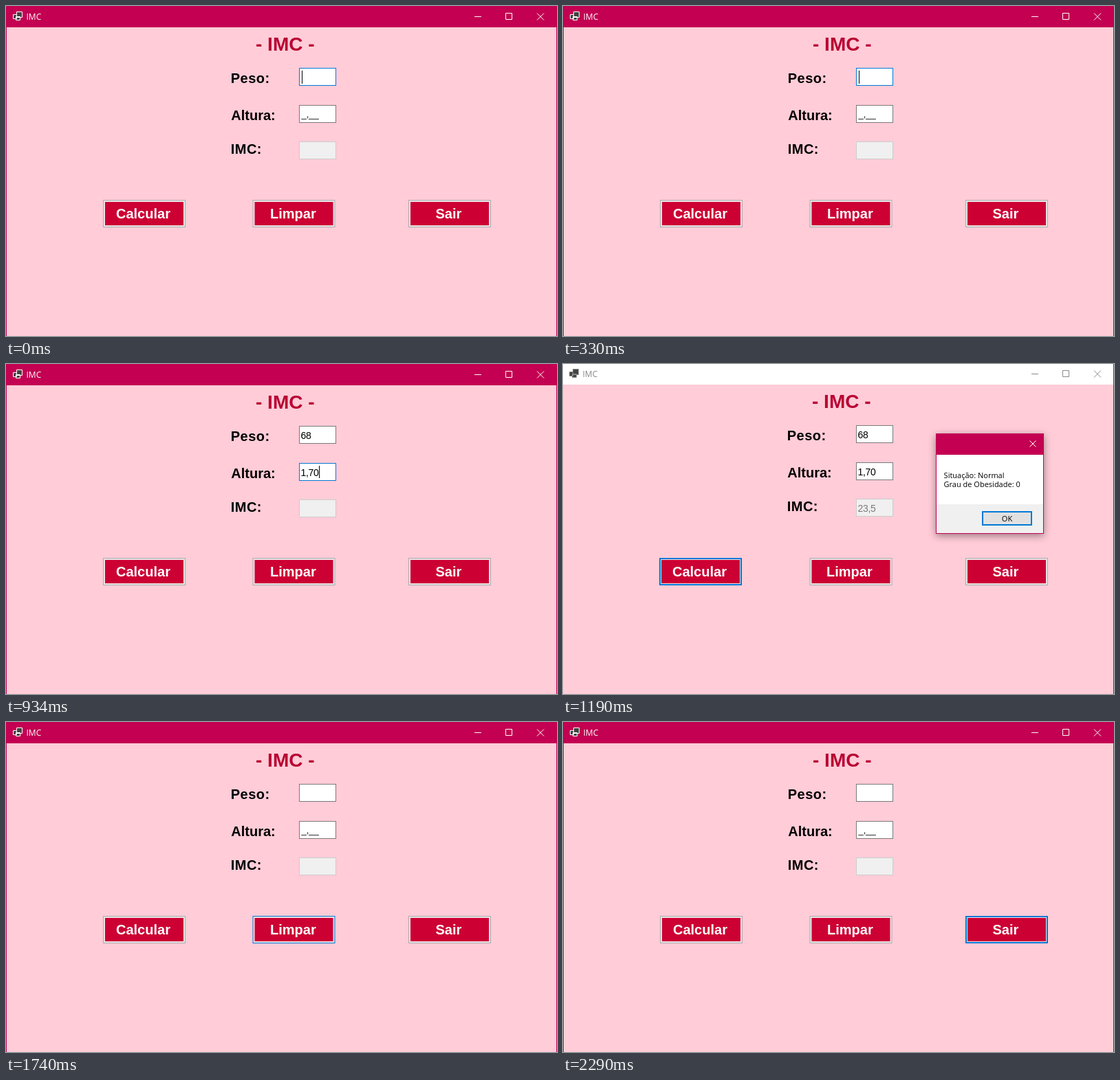
Animation, 801 px wide and 480 px high, one loop 2840 ms. Source, as an HTML page:

```html
<!DOCTYPE html>
<html lang="pt">
<head>
<meta charset="utf-8">
<title>IMC</title>
<style>
html, body { margin: 0; width: 100%; height: 100%; overflow: hidden; background: #ffccd8; }
svg {
  display: block; width: 801px; height: 480px;
  --dx: 0px; --dy: 0px;
  --bar: #c30052; --ink: #fff; --left: #c30052; --right: #c30052;
  --typed: 0; --blank: 1; --result: 0; --caret1: 1; --caret2: 0;
  --peso: #0078d7; --altura: #7a7a7a;
  --calc: #adadad; --limpar: #adadad; --sair: #adadad;
  --calcRing: #e1e1e1; --sairRing: #e1e1e1;
  animation: demo 2840ms step-end infinite;
}
@keyframes demo {
  0% {
    --dx: 0px; --dy: 0px;
    --bar: #c30052; --ink: #fff; --left: #c30052; --right: #c30052;
    --typed: 0; --blank: 1; --result: 0; --caret1: 1; --caret2: 0;
    --peso: #0078d7; --altura: #7a7a7a;
    --calc: #adadad; --limpar: #adadad; --sair: #adadad;
    --calcRing: #e1e1e1; --sairRing: #e1e1e1;
  }
  /* values typed */
  19.3661% {
    --typed: 1; --blank: 0; --caret1: 0; --caret2: 1;
    --peso: #7a7a7a; --altura: #0078d7;
  }
  /* result dialog, main window inactive */
  41.9014% {
    --dx: -1px; --dy: -1px;
    --bar: #fff; --ink: #888; --left: #ffccd8; --right: #5c3f63;
    --result: 1; --caret2: 0; --altura: #7a7a7a;
    --calc: #0078d7; --calcRing: #0078d7;
  }
  /* cleared */
  61.2676% {
    --dx: 0px; --dy: 0px;
    --bar: #c30052; --ink: #fff; --left: #c30052; --right: #c30052;
    --typed: 0; --blank: 1; --result: 0;
    --calc: #adadad; --calcRing: #e1e1e1; --limpar: #0078d7;
  }
  /* exit focused */
  80.6338% { --limpar: #adadad; --sair: #0078d7; --sairRing: #0078d7; }
}
.shift { transform: translate(var(--dx), var(--dy)); }
.up { transform: translateY(var(--dy)); }
.side { transform: translateX(var(--dx)); }
.ui { font: 12px "Open Sans", "Noto Sans", sans-serif; }
.label { font: bold 20px "Liberation Sans", Arial, sans-serif; }
.head { font: bold 28px "Liberation Sans", Arial, sans-serif; fill: #b90032; }
.wide { letter-spacing: .45px; }
.value { font: 14px "Liberation Sans", Arial, sans-serif; letter-spacing: -.3px; }
.mask { font-size: 13px; letter-spacing: 0; }
.line { fill: none; stroke: var(--ink); }
.field { fill: #fff; }
.typed { opacity: var(--typed); }
.blank { opacity: var(--blank); }
.result { opacity: var(--result); }
.white { fill: #fff; }
.msg { font-size: 11px; }
.shadow { filter: drop-shadow(0 3px 6px rgba(0, 0, 0, .4)); }
</style>
</head>
<body>
<svg viewBox="0 0 801 480">
  <defs>
    <g id="face">
      <rect x="2" y="2" width="116" height="36" fill="#f4e4e8"/>
      <rect x="3" y="3" width="114" height="34" fill="#cc0033"/>
    </g>
  </defs>

  <rect width="801" height="480" fill="#ffccd8"/>
  <rect y="30" width="1" height="450" style="fill:var(--left)"/>

  <g class="up">
    <rect y="-4" width="801" height="35" style="fill:var(--bar)"/>
    <path class="line" d="M681 15.5h10M726.5 10.5h9v9h-9zM772 10.5l10 10M782 10.5l-10 10"/>
  </g>
  <rect x="800" width="1" height="480" style="fill:var(--right)"/>

  <g class="shift">
    <g class="line" style="fill:#444">
      <path d="M10.5 12.5h5v6h-5zM15.5 8.5h8v8h-8zM14.5 15.5h6v5h-6z"/>
    </g>
    <text class="ui" x="29.5" y="20" style="fill:var(--ink)">IMC</text>
    <text class="head" x="363" y="65">- IMC -</text>
    <g class="label">
      <text class="wide" x="326.8" y="112">Peso:</text>
      <text x="327.3" y="166">Altura:</text>
      <text class="wide" x="326.8" y="215">IMC:</text>
    </g>
  </g>

  <g class="up">
    <rect class="field" x="426.5" y="90.5" width="53" height="25" style="stroke:var(--peso)"/>
    <rect class="field" x="426.5" y="144.5" width="53" height="25" style="stroke:var(--altura)"/>
    <rect x="426.5" y="197.5" width="53" height="25" fill="#f0f0f0" stroke="#ccc"/>
    <g class="value">
      <g class="typed">
        <text x="428.5" y="109">68</text>
        <text x="428.5" y="163">1,70</text>
      </g>
      <text class="blank mask" x="429.5" y="162">_,__</text>
      <text class="result" x="428.5" y="216" fill="#7a7a7a">23,5</text>
    </g>
    <rect x="430" y="94" width="1" height="19" style="opacity:var(--caret1)"/>
    <rect x="455" y="148" width="1" height="18" style="opacity:var(--caret2)"/>
  </g>

  <g class="label">
    <g class="side">
      <g transform="translate(141 282)">
        <rect width="120" height="40" style="fill:var(--calc)"/>
        <rect x="1" y="1" width="118" height="38" style="fill:var(--calcRing)"/>
        <use href="#face"/>
      </g>
      <text class="white" x="160" y="309">Calcular</text>
    </g>
    <g transform="translate(358.5 282)">
      <rect width="120" height="40" style="fill:var(--limpar)"/>
      <rect x="1" y="1" width="118" height="38" fill="#e1e1e1"/>
      <use href="#face"/>
    </g>
    <text class="white side" x="384" y="309">Limpar</text>
    <g transform="translate(585 282)">
      <rect width="120" height="40" style="fill:var(--sair)"/>
      <rect x="1" y="1" width="118" height="38" style="fill:var(--sairRing)"/>
      <use href="#face"/>
    </g>
    <text class="white" x="624.5" y="309">Sair</text>
  </g>

  <g class="result ui msg">
    <rect class="shadow" x="542" y="101" width="157" height="146" fill="#c30052"/>
    <rect x="543" y="132" width="155" height="72" fill="#fff"/>
    <rect x="543" y="204" width="155" height="42" fill="#f0f0f0"/>
    <path d="M678.5 111.5l9 9M687.5 111.5l-9 9" stroke="#fff"/>
    <text x="553.6" y="166">Situação: Normal</text>
    <text x="553.6" y="179">Grau de Obesidade: 0</text>
    <rect x="610" y="215" width="71" height="19" fill="#e1e1e1" stroke="#0078d7" stroke-width="2"/>
    <text x="645.5" y="229" text-anchor="middle">OK</text>
  </g>
</svg>
</body>
</html>
```
